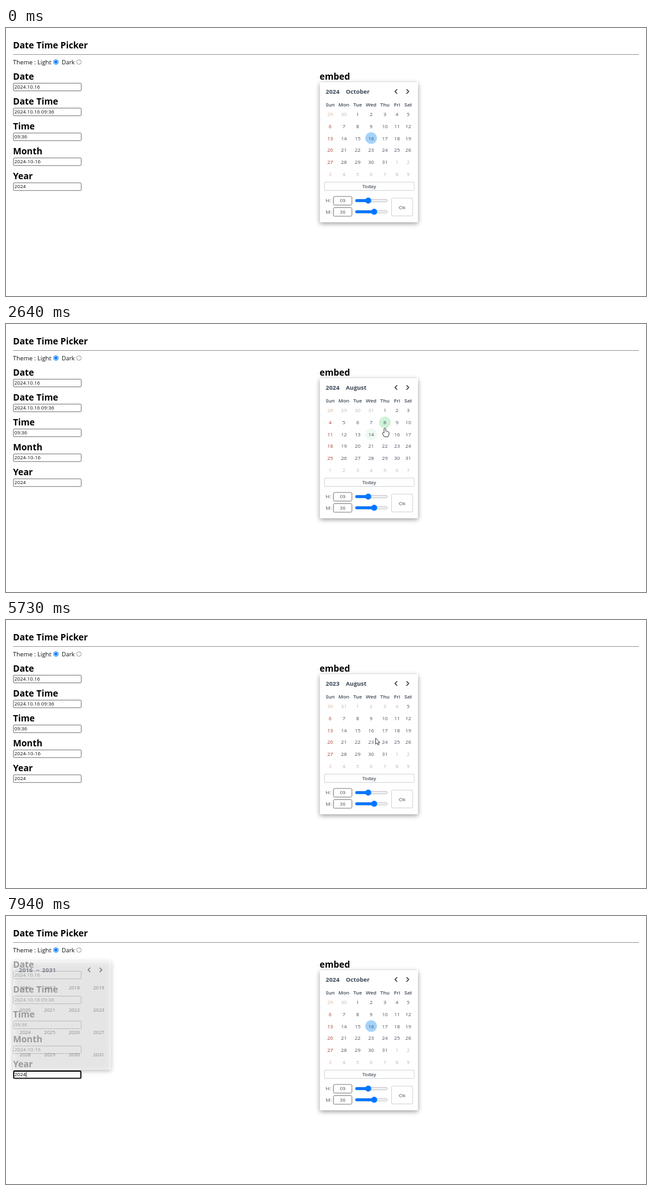
Animation of 1000x420 px, one loop 8000 ms. Source, as an HTML page with a canvas:

```html
<!DOCTYPE html>
<html lang="en">
<head>
<meta charset="utf-8">
<title>Date Time Picker</title>
<style>
html, body { margin: 0; height: 100%; overflow: hidden; background: #fff; }
canvas { display: block; width: 1000px; height: 420px; }
</style>
</head>
<body>
<canvas id="stage"></canvas>
<script>
const LOOP = 8000, FADE = 220;
const INK = '#485363', HEAD = '#3b4656', PALE = '#b4b7bb', BLUE = '#0075ff', GREEN = '#d0f2d8';
const SUNDAY = '#a83f2c', PALE_SUNDAY = '#dfb09c';
const DAYS = ['Sun', 'Mon', 'Tue', 'Wed', 'Thu', 'Fri', 'Sat'];
const MONTHS = ['January', 'February', 'March', 'April', 'May', 'June', 'July',
  'August', 'September', 'October', 'November', 'December'];
const DAY_X = [506.5, 528, 549.5, 570.5, 592, 611, 628.5];
const FIELDS = [['Date', '2024.10.16'], ['Date Time', '2024.10.16 09:36'], ['Time', '09:36'],
  ['Month', '2024-10-16'], ['Year', '2024']];
const MIN_DATE = new Date(2023, 7, 5), TODAY = new Date(2024, 9, 16);
const FOCUS_AT = 7650, POPUP_AT = 7760, POPUP_MS = 300;

// What the embedded picker shows: start time, kind, year, month
const VIEWS = [
  [0, 'days', 2024, 9], [1060, 'months', 2024], [1790, 'days', 2024, 7],
  [3020, 'days', 2024, 8], [3190, 'days', 2024, 9], [3720, 'days', 2024, 8],
  [3900, 'days', 2024, 7], [4340, 'years', 2024], [5150, 'days', 2023, 7],
  [6710, 'days', 2024, 9]
];
// Pointer path: time, x, y
const PATH = [
  [50, 780, 250], [720, 550, 102], [1080, 550, 102], [1230, 565, 150], [1350, 578, 195],
  [1410, 580, 203], [1960, 580, 203], [2300, 550, 175], [2640, 592, 162.8], [2700, 592, 162.8],
  [2840, 627, 101], [3360, 627, 101], [3480, 610.5, 101], [3960, 610.5, 101], [4250, 510, 102],
  [4400, 510, 102], [4690, 630, 200], [4870, 632, 177], [5000, 626, 165], [5200, 626, 165],
  [5550, 580, 190], [6110, 570, 170], [6380, 590, 215], [6510, 593, 246], [6740, 593, 246],
  [7470, 60, 249]
];
const HAND = new Path2D('M-1.3 8V1.2Q0-1 1.3 1.2V5Q2.4 4.4 3.1 5.5Q4.3 5 4.9 6.2Q6.6 6 6.6 7.8L6 11.5L5 14H-.6L-4 9.2Q-3.6 7-2.2 7.6Z');
const ARROW = new Path2D('M0 0V9.6L2.2 7.6L3.7 10.8L5.2 10.1L3.8 7H6.8Z');

const canvas = document.getElementById('stage');
const g = canvas.getContext('2d');
const dpr = window.devicePixelRatio || 1;
canvas.width = 1000 * dpr;
canvas.height = 420 * dpr;

function text(s, x, y, size, color = INK, weight = 400, align = 'left') {
  g.font = `${weight} ${size}px "Open Sans", "Noto Sans", sans-serif`;
  g.fillStyle = color;
  g.textAlign = align;
  g.fillText(s, x, y + size * 0.36);
}

function box(x, y, w, h, r, fill, stroke, width = 1) {
  g.beginPath();
  g.roundRect(x, y, w, h, r);
  paint(fill, stroke, width);
}

function disc(x, y, r, fill, stroke, width = 1) {
  g.beginPath();
  g.arc(x, y, r, 0, 7);
  paint(fill, stroke, width);
}

function paint(fill, stroke, width) {
  if (fill) { g.fillStyle = fill; g.fill(); }
  if (stroke) { g.strokeStyle = stroke; g.lineWidth = width; g.stroke(); }
}

function pointer(t) {
  if (t < PATH[0][0]) return null;
  const i = PATH.findIndex(p => p[0] > t);
  if (i < 0) return PATH[PATH.length - 1].slice(1);
  const [t0, x0, y0] = PATH[i - 1], [t1, x1, y1] = PATH[i];
  const k = (t - t0) / (t1 - t0), e = k * k * (3 - 2 * k);
  return [x0 + (x1 - x0) * e, y0 + (y1 - y0) * e];
}

const viewAt = t => VIEWS.filter(v => v[0] <= t).pop();
const inCell = (p, c) => p && Math.hypot(p[0] - c.x, p[1] - c.y) <= c.r;
const inRect = (p, x, y, w, h) => p && p[0] >= x && p[0] <= x + w && p[1] >= y && p[1] <= y + h;

// Full while hovered, then fades out
function glow(cell, t, since) {
  for (let d = 0; d < FADE && t - d >= since; d += 10)
    if (inCell(pointer(t - d), cell)) return 1 - d / FADE;
  return 0;
}

function cellsOf([, kind, year, month], limited) {
  if (kind === 'months') return MONTHS.map((m, i) => ({
    label: m.slice(0, 3), x: 515.5 + i % 3 * 51.3, y: 127 + (i / 3 | 0) * 35, r: 15.5, on: true, color: INK
  }));
  if (kind === 'years') return Array.from({ length: 16 }, (_, i) => {
    const y = 2016 + i, on = !limited || Math.abs(y - 2024) < 2;
    return { label: y, x: 509.5 + i % 4 * 38.3, y: 127 + (i >> 2) * 35, r: 15.5, on, color: on ? INK : PALE };
  });
  const first = new Date(year, month, 1).getDay();
  return Array.from({ length: 42 }, (_, i) => {
    const date = new Date(year, month, 1 - first + i), col = i % 7;
    const on = date.getMonth() === month && date >= MIN_DATE;
    const color = col ? (on ? INK : PALE) : (on ? SUNDAY : PALE_SUNDAY);
    return { label: date.getDate(), x: DAY_X[col], y: 135.5 + (i / 7 | 0) * 18.7, r: 9.2, on, color,
      picked: +date === +TODAY };
  });
}

function chevron(x, dir) {
  g.beginPath();
  g.moveTo(x - 1.7 * dir, 96);
  g.lineTo(x + 1.7 * dir, 99.5);
  g.lineTo(x - 1.7 * dir, 103);
  paint(null, '#3a3f46', 1.5);
}

function slider(label, value, y, thumb) {
  text(label, 499.5, y, 8);
  box(511.5, y - 6.5, 29, 13.5, 2, '#fff', '#858585');
  text(value, 526, y, 7.8, INK, 400, 'center');
  box(546, y - 2, 50, 4, 2, '#efefef', '#b8b8b8', 0.7);
  box(545.7, y - 2.3, thumb - 545.7, 4.6, 2, BLUE);
  disc(thumb, y, 4.7, BLUE);
}

function picker(view, t, p, limited) {
  const [since, kind, year, month] = view, days = kind === 'days';
  g.save();
  g.shadowColor = 'rgba(0,0,0,.42)';
  g.shadowBlur = 7 * dpr;
  g.shadowOffsetY = 2 * dpr;
  box(490.3, 85, 153.5, days ? 219.5 : 171, 2, '#fff');
  g.restore();

  if (kind === 'years') {
    text('2016', 499.5, 99.5, 9.5, HEAD, 700);
    text('~', 529, 99.5, 9.5, HEAD, 700, 'center');
    text('2031', 557.5, 99.5, 9.5, HEAD, 700, 'right');
  } else {
    text(year, 499.5, 99.5, 9.5, HEAD, 700);
    if (days) text(MONTHS[month], 531, 99.5, 9.2, HEAD, 700);
  }
  for (const [x, dir] of [[609.5, -1], [627.5, 1]]) {
    if (inRect(p, x - 7.5, 92, 15, 15)) box(x - 7.5, 92, 15, 14.5, 1, '#e3e3e3');
    chevron(x, dir);
  }

  for (const c of cellsOf(view, limited)) {
    const alpha = p && c.on ? glow(c, t, since) : 0;
    if (c.picked) disc(c.x, c.y - 0.5, 9.2, '#a5d3fb');
    if (alpha) {
      g.globalAlpha = alpha;
      disc(c.x, c.y, c.r, GREEN);
      g.globalAlpha = 1;
    }
    text(c.label, c.x, c.y, days ? 7.8 : 7.6, c.color, 400, 'center');
  }
  if (!days) return;

  DAYS.forEach((d, i) => text(d, DAY_X[i], 120, 7.8, HEAD, 600, 'center'));
  const over = inRect(p, 497, 241, 141, 14);
  box(497.5, 241.5, 140.5, 13, 1.5, over ? '#e5e5e5' : '#fff', over ? '#c8c8c8' : '#d6d6d6');
  text('Today', 567.5, 248, 7.5, over ? '#6a6f77' : INK, 600, 'center');
  slider('H:', '09', 270.5, 566);
  slider('M:', '36', 288, 575.3);
  box(602.5, 266.5, 33, 28, 1.5, '#fff', '#d6d6d6');
  text('Ok', 619, 281, 8, INK, 400, 'center');
}

function page(t) {
  text('Date Time Picker', 11, 27.5, 13.85, '#000', 700);
  g.fillStyle = '#a0a0a0';
  g.fillRect(11, 41, 978, 1);
  text('Theme : Light', 11, 53.5, 9.5, '#111');
  text('Dark', 87, 53.5, 9.2, '#111');
  disc(78, 53.3, 3.6, '#fff', BLUE, 1);
  disc(78, 53.3, 2.3, BLUE);
  disc(114, 53.3, 3.6, '#fff', '#858585', 0.8);
  text('embed', 490, 76, 13.85, '#000', 700);
  FIELDS.forEach(([name, value], i) => {
    const y = 86 + i * 39.05, focus = i === 4 && t >= FOCUS_AT;
    text(name, 11, y - 10, 13.85, '#000', 700);
    if (focus) box(12, y + 0.8, 105, 11.4, 1.5, '#fff', '#101010', 1.8);
    else box(11.5, y + 0.5, 106, 12, 1.5, '#fff', '#808080');
    text(value, 13, y + 6.4, 7.85, '#111');
    if (focus) {
      g.fillStyle = '#111';
      g.fillRect(31, y + 2.5, 0.8, 8);
    }
  });
}

function drawPointer(p, view) {
  if (!p || inRect(p, 11, 242, 107, 13)) return;
  const hand = inRect(p, 499, 92, 70, 15) || inRect(p, 602, 92, 33, 15) ||
    cellsOf(view, true).some(c => c.on && inCell(p, c));
  const shape = hand ? HAND : ARROW;
  g.save();
  g.translate(...p);
  g.lineJoin = 'round';
  g.fillStyle = '#fff';
  g.fill(shape);
  g.strokeStyle = '#333';
  g.lineWidth = 0.9;
  g.stroke(shape);
  g.restore();
}

function draw(now) {
  const t = now % LOOP, p = pointer(t), view = viewAt(t);
  g.setTransform(dpr, 0, 0, dpr, 0, 0);
  g.fillStyle = '#fff';
  g.fillRect(0, 0, 1000, 420);
  page(t);
  picker(view, t, p, true);
  if (t > POPUP_AT) {
    g.save();
    g.translate(-479.5, -15);
    g.globalAlpha = Math.min(1, (t - POPUP_AT) / POPUP_MS);
    picker([POPUP_AT, 'years', 2024], t, null, false);
    g.restore();
  }
  drawPointer(p, view);
}

const start = performance.now();
function tick() {
  draw(performance.now() - start);
  requestAnimationFrame(tick);
}
tick();
</script>
</body>
</html>
```
